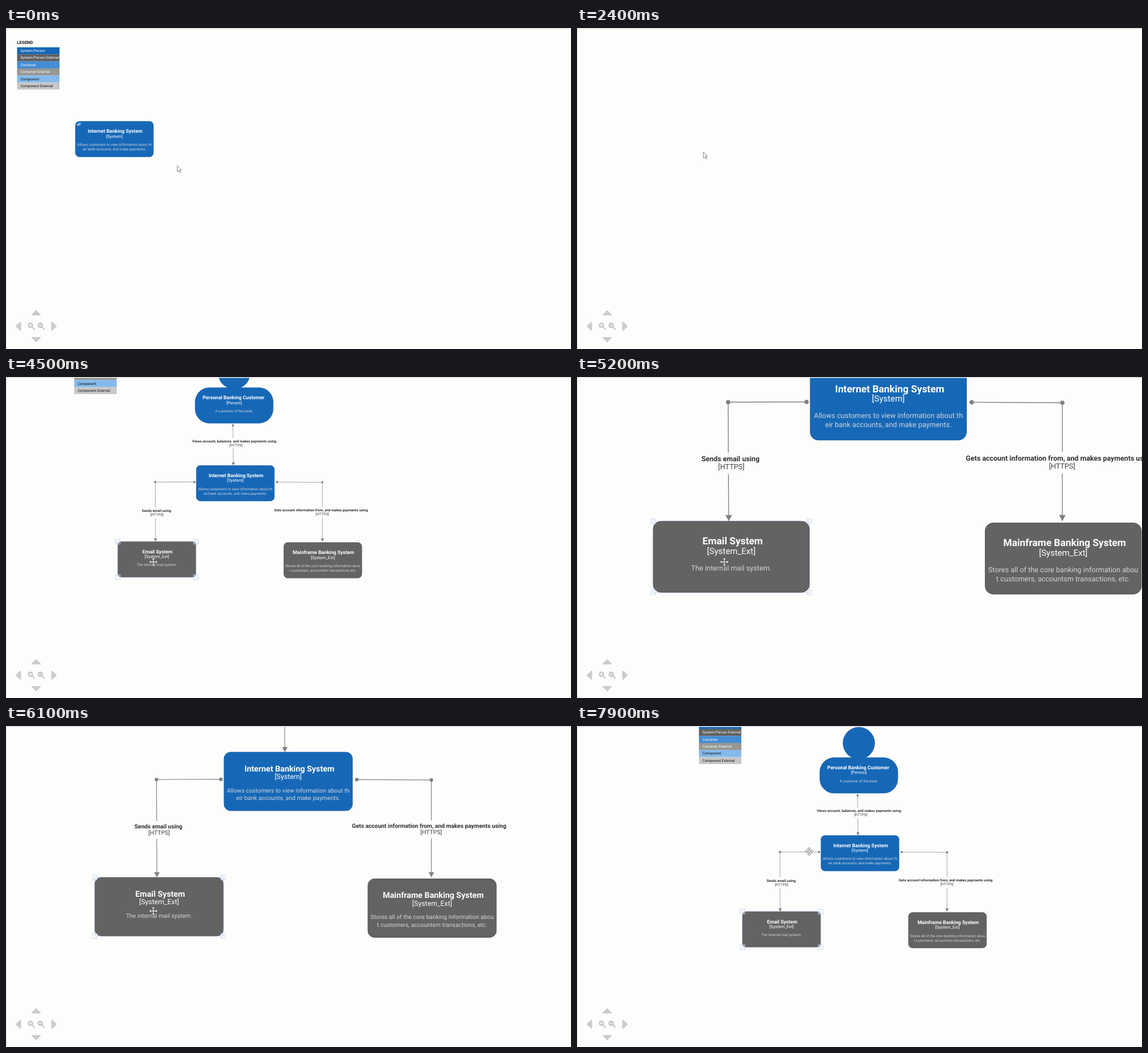
An HTML page for the animation above (8000 ms loop, 993 by 564 pixels).

```html
<!DOCTYPE html>
<html lang="en">
<head>
<meta charset="utf-8">
<title>Diagram navigation</title>
<style>
  html, body { margin: 0; width: 100%; height: 100%; overflow: hidden; background: #fdfdfc; }
  svg { display: block; width: 993px; height: 564px; }
  text { font-family: Roboto, Arial, sans-serif; text-rendering: geometricPrecision; }
</style>
</head>
<body>
<svg id="stage" viewBox="0 0 993 564" xmlns="http://www.w3.org/2000/svg"></svg>
<script>
const LOOP = 8000, STEP = 100;
const OVERVIEW_END = 2200, DIAGRAM_START = 2600, SELECT_TIME = 4500;
const BLUE = '#1668b7', BLUE_EDGE = '#0f559b', GREY = '#636362', GREY_EDGE = '#4a4a4a', LINE = '#808080';
const BOX = { w: 137.2, h: 62.5 };
const EMAIL = { x: 131.5, y: 320.2 };
const BANKING_TEXT = ['Allows customers to view information about th', 'eir bank accounts, and make payments.'];

// Areas of the diagram and the overview over which the pointer changes.
const hotspots = { overview: [], diagram: [] };

const text = (x, y, size, fill, content, { bold = false, anchor = 'middle' } = {}) =>
  `<text x="${x}" y="${y}" font-size="${size}" fill="${fill}" text-anchor="${anchor}"` +
  `${bold ? ' font-weight="700"' : ''}>${content}</text>`;

const rect = (x, y, w, h, attrs = '') =>
  `<rect x="${x}" y="${y}" width="${w}" height="${h}" ${attrs}/>`;

const circle = (x, y, r, attrs) => `<circle cx="${x}" cy="${y}" r="${r}" ${attrs}/>`;

function node(scene, { x, y }, title, kind, lines, { external = false, round = 7, shift = 1.2 } = {}) {
  const cx = x + BOX.w / 2;
  const paint = external ? `fill="${GREY}" stroke="${GREY_EDGE}"` : `fill="${BLUE}" stroke="${BLUE_EDGE}"`;
  hotspots[scene].push({ x, y, ...BOX });
  return rect(x, y, BOX.w, BOX.h, `rx="${round}" ${paint} stroke-width=".5"`) +
    text(cx + shift, y + 20.5, 8.69, '#fff', title, { bold: true }) +
    text(cx, y + 28.8, 7.5, '#fff', kind) +
    lines.map((line, i) => text(cx, y + 43.1 + 8.05 * i, 6.33, '#d0d4d8', line)).join('');
}

// The last point is the arrow tip; the label interrupts the last stretch of the line.
function edge(points, label, labelX, tagX, labelY) {
  const [tipX, tipY] = points[points.length - 1];
  points.slice(1).forEach(([x, y], i) => {
    const [x0, y0] = points[i];
    hotspots.diagram.push({ x: Math.min(x, x0) - 3, y: Math.min(y, y0) - 3, w: Math.abs(x - x0) + 6, h: Math.abs(y - y0) + 6 });
  });
  return `<path d="M${points.join('L')}" fill="none" stroke="${LINE}" stroke-width=".7"/>` +
    rect(tipX - 6, labelY - 7.8, 12, 19, 'fill="#fdfdfc"') +
    points.slice(0, -1).map(([x, y]) => circle(x, y, 1.9, `fill="${LINE}"`)).join('') +
    `<path d="M${tipX} ${tipY}l-2.9 -5.3h5.8z" fill="${LINE}"/>` +
    text(labelX, labelY, 6.21, '#303030', label, { bold: true }) +
    text(tagX, labelY + 7, 6.33, '#404040', '[HTTPS]');
}

function legend(x, y) {
  const shades = { Person: [BLUE, '#605f61'], Container: ['#448dd5', '#979794'], Component: ['#84baec', '#c8c8c8'] };
  const rowHeight = 12.35;
  const rows = Object.entries(shades).flatMap(([name, fills]) => fills.map((fill, i) => ({
    fill,
    label: (name === 'Person' ? 'System/Person' : name) + (i ? ' External' : ''),
    ink: name === 'Component' ? '#111' : '#fff'
  })));
  return text(x, y - 6, 7.5, '#111', 'LEGEND', { bold: true, anchor: 'start' }) +
    rows.map(({ label, fill, ink }, i) =>
      rect(x, y + i * rowHeight, 74.5, rowHeight + .1, `fill="${fill}"`) +
      text(x + 6, y + i * rowHeight + 8.2, 6.3, ink, label, { anchor: 'start' })).join('');
}

function overview() {
  const link = `<g transform="translate(128.2 169.2) rotate(-38)" fill="none" stroke="#fff" stroke-width=".85">
    ${rect(-3.4, -1.5, 4, 2.6, 'rx="1.3"')}${rect(-.6, -1, 4, 2.6, 'rx="1.3"')}</g>`;
  return legend(19.5, 33.9) +
    node('overview', { x: 121.9, y: 163.9 }, 'Internet Banking System', '[System]', BANKING_TEXT) + link;
}

function diagram() {
  const add = (...args) => node('diagram', ...args);
  return legend(55, -13.1) +
    add({ x: 267.4, y: 49.7 }, 'Personal Banking Customer', '[Person]', ['A customer of the bank.'],
      { round: 25, shift: -1.1 }) +
    circle(336, 24.2, 28, `fill="${BLUE}" stroke="${BLUE_EDGE}" stroke-width=".5"`) +
    add({ x: 269.5, y: 186.4 }, 'Internet Banking System', '[System]', BANKING_TEXT) +
    add(EMAIL, 'Email System', '[System_Ext]', ['The internal mail system.'], { external: true }) +
    add({ x: 423.2, y: 321.7 }, 'Mainframe Banking System', '[System_Ext]',
      ['Stores all of the core banking information abou', 't customers, accountsm transactions, etc.'], { external: true }) +
    edge([[333.8, 116], [334.5, 186.2]],
      'Views account, balances, and makes payments using', 336.1, 339.4, 145.6) +
    edge([[266.2, 215.4], [197.3, 215.6], [197.8, 320]],
      'Sends email using', 199.4, 200.1, 267.7) +
    edge([[411.3, 215.7], [491, 216.1], [491, 320]],
      'Gets account information from, and makes payments using', 488.6, 490.8, 267.1);
}

function controls() {
  const glass = (x, sign) => `<path d="M${x + 3} 525.5l4 4" stroke="#c8c8c8" stroke-width="2.2" stroke-linecap="round"/>` +
    circle(x, 522.4, 4.8, 'fill="#c8c8c8"') +
    `<path d="${sign}" transform="translate(${x} 522.4)" stroke="#fff" stroke-width="1.3"/>`;
  return `<path d="M53 497l7 7h-14zM46 544h14l-7 7zM18 524l7.5 -7v14zM88 524l-7.5 -7v14z"
      fill="#ccc" stroke="#ccc" stroke-width="2" stroke-linejoin="round"/>` +
    glass(43, 'M-2.8 0h5.6M0 -2.8v5.6') + glass(60.2, 'M-2.8 0h5.6');
}

const quarter = angle => `<path d="M-.9 -.9V-4.4H-2.9L0 -7.4L2.9 -4.4H.9V-.9" transform="rotate(${angle})"/>`;

const stage = document.getElementById('stage');
stage.innerHTML = `
  <rect width="993" height="564" fill="#fdfdfc"/>
  <g id="overview">${overview()}</g>
  <g id="diagram">${diagram()}</g>
  <g id="selection" fill="none" stroke="#c3d7ee"></g>
  ${controls()}
  <rect width="993" height="1.6" fill="#dedede"/>
  <rect width="1" height="564" fill="#e2e2e2"/>
  <path id="arrow" d="M0 0V10.6L2.5 8.3L4.2 12L5.9 11.2L4.2 7.6H7.4Z" fill="#fff" stroke="#777" stroke-width=".9"/>
  <g id="mover" fill="#fff" stroke="#666" stroke-width=".8" stroke-linejoin="round">
    ${[0, 90, 180, 270].map(quarter).join('')}${rect(-.9, -.9, 1.8, 1.8, 'stroke="none"')}
  </g>`;

const part = Object.fromEntries(
  ['overview', 'diagram', 'selection', 'arrow', 'mover'].map(id => [id, document.getElementById(id)]));

// Gestures change the state by the fraction k that is done.
const moveTo = (x, y) => (state, k) => {
  state.px += (x - state.px) * k;
  state.py += (y - state.py) * k;
};

const dragTo = (x, y) => (state, k) => {
  const { px, py } = state;
  moveTo(x, y)(state, k);
  state.x += state.px - px;
  state.y += state.py - py;
  state.dragging = k < 1;
};

// Zooming is exponential and keeps the point under the pointer in place.
const zoomTo = scale => (state, k) => {
  const ratio = (scale / state.scale) ** k;
  state.x = state.px + (state.x - state.px) * ratio;
  state.y = state.py + (state.y - state.py) * ratio;
  state.scale *= ratio;
};

const GESTURES = [
  { from: 500, to: 1700, act: moveTo(222, 218) },
  { from: 2600, to: 2900, act: moveTo(260.5, 380) },
  { from: 2950, to: 3500, act: dragTo(296, 333) },
  { from: 3600, to: 4100, act: dragTo(361, 302) },
  { from: 4100, to: 4450, act: moveTo(259, 325) },
  { from: 4600, to: 5100, act: zoomTo(2) },
  { from: 5700, to: 6300, act: zoomTo(1.492) },
  { from: 6300, to: 6500, act: moveTo(495, 209) },
  { from: 6500, to: 6900, act: dragTo(513, 282) },
  { from: 7000, to: 7200, act: moveTo(508.5, 288.5) },
  { from: 7200, to: 7600, act: zoomTo(1) },
  { from: 7600, to: 7900, act: moveTo(408, 220.5) }
];

function stateAt(t) {
  const state = { px: 301, py: 242, x: -35.5, y: 47, scale: 1, dragging: false };
  for (const { from, to, act } of GESTURES) {
    if (t >= from) act(state, Math.min(1, (t - from) / (to - from)));
  }
  return state;
}

const show = (el, on) => el.setAttribute('visibility', on ? 'visible' : 'hidden');

const hits = (areas, x, y) =>
  areas.some(a => x >= a.x && x <= a.x + a.w && y >= a.y && y <= a.y + a.h);

function drawSelection({ x, y, scale }) {
  const left = x + EMAIL.x * scale, top = y + EMAIL.y * scale;
  const w = BOX.w * scale, h = BOX.h * scale;
  const handles = [0, w].flatMap(dx => [0, h].map(dy => rect(left + dx - 4, top + dy - 4, 8, 8)));
  part.selection.innerHTML = rect(left, top, w, h, 'stroke="#7f9cc8" stroke-opacity=".4"') + handles.join('');
}

function draw(t) {
  const state = stateAt(t);
  const { px, py, x, y, scale } = state;
  const inOverview = t < OVERVIEW_END, inDiagram = t >= DIAGRAM_START;
  const hover = inOverview ? hits(hotspots.overview, px, py)
    : inDiagram && hits(hotspots.diagram, (px - x) / scale, (py - y) / scale);
  const moving = state.dragging || hover;
  show(part.overview, inOverview);
  show(part.diagram, inDiagram);
  show(part.selection, t >= SELECT_TIME);
  show(part.arrow, !moving);
  show(part.mover, moving);
  part.diagram.setAttribute('transform', `translate(${x} ${y}) scale(${scale})`);
  drawSelection(state);
  (moving ? part.mover : part.arrow).setAttribute('transform', `translate(${px} ${py})`);
}

const start = performance.now();
function tick() {
  const t = (performance.now() - start) % LOOP;
  draw(Math.floor(t / STEP) * STEP);
  requestAnimationFrame(tick);
}
draw(0);
requestAnimationFrame(tick);
</script>
</body>
</html>
```
